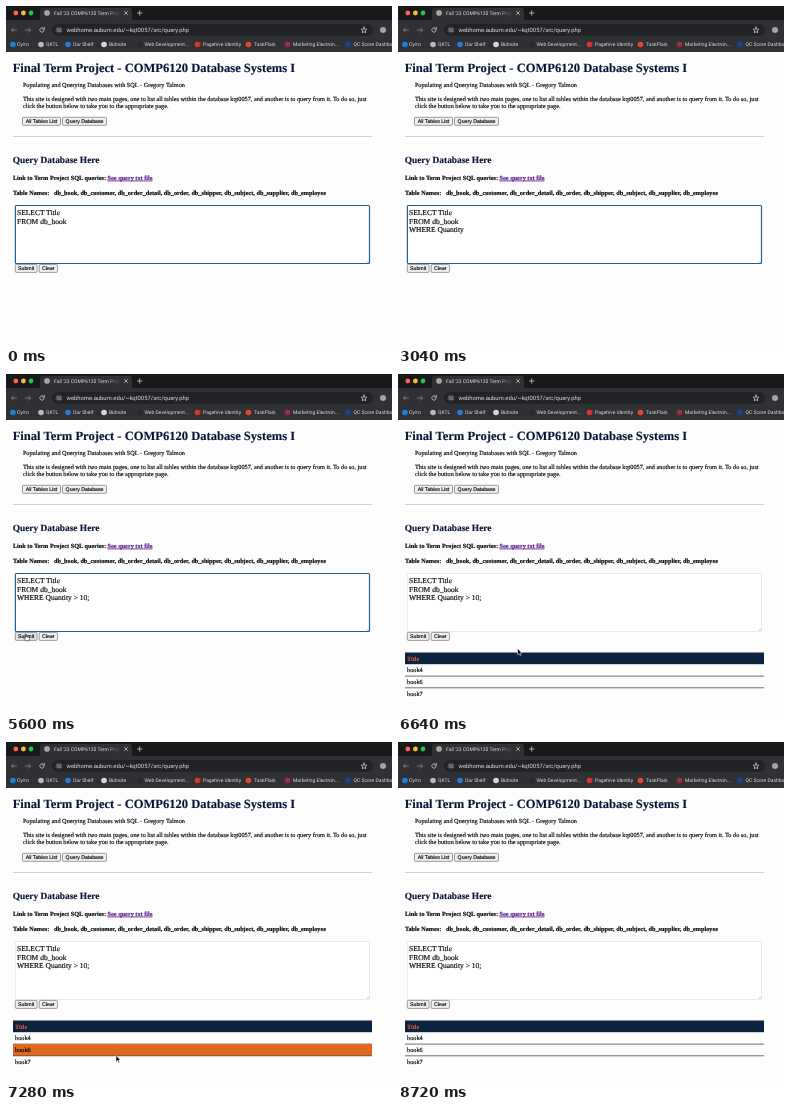
Write an HTML page that moves like this. It is 386x340 px and loops after 8800 ms.

```html
<!DOCTYPE html>
<html lang="en">
<head>
<meta charset="utf-8">
<title>Query page</title>
<style>
html, body { margin: 0; width: 100%; height: 100%; overflow: hidden; background: #fdfdfd; }
svg { display: block; width: 386px; height: 340px; }
text { white-space: pre; text-rendering: geometricPrecision; }
.serif { font: 6.25px "Liberation Serif", "Times New Roman", serif; }
.sans { font: 5.2px "Liberation Sans", Arial, sans-serif; }
.serif text, .sans text { stroke: #000; stroke-width: .14; }
.ui { font: 5px Roboto, sans-serif; fill: #dcdde0; }
.bold { font-weight: bold; }
.serif .title { font-weight: bold; fill: #0a1636; stroke: #0a1636; }
.line { fill: none; stroke: #c8c9cc; stroke-width: .8; stroke-linecap: round; }
.dim { stroke: #85868a; }
</style>
</head>
<body>
<svg viewBox="0 0 386 340">
  <!-- browser frame -->
  <rect width="386" height="46" fill="#303134"/>
  <rect width="386" height="14" fill="#18191b"/>
  <path d="M32 14q2 0 2-2V5q0-3 3-3h86q3 0 3 3v7q0 2 2 2z" fill="#303134"/>
  <circle cx="9.8" cy="7" r="2.4" fill="#ff5f57"/>
  <circle cx="17.4" cy="7" r="2.4" fill="#febc2e"/>
  <circle cx="25" cy="7" r="2.4" fill="#28c840"/>
  <g id="globe">
    <circle cx="41" cy="7" r="2.7" fill="#c8c9cc"/>
    <path d="M38.5 6.2h5M38.5 8h5M41 4.5v5" stroke="#55565a" stroke-width=".4"/>
  </g>
  <path id="spinner" class="line" d="M41 4.4a2.6 2.6 0 1 1-2.6 2.6" style="stroke:#8ab4f8"/>
  <linearGradient id="fade" gradientUnits="userSpaceOnUse" x1="100" x2="115">
    <stop stop-color="#dcdde0"/><stop offset="1" stop-color="#303134"/>
  </linearGradient>
  <text class="ui" x="48" y="8.8" style="fill:url(#fade)">Fall '23 COMP6120 Term Proj</text>
  <path class="line" d="M118.5 5.5l3 3m0-3l-3 3M131.5 7h4.4m-2.2-2.2v4.4"/>
  <path class="line dim" d="M10.5 24H5.5m2.2-2.2L5.5 24l2.2 2.2M19.5 24h5m-2.2-2.2l2.2 2.2-2.2 2.2"/>
  <path class="line" d="M38 22.6a2.3 2.3 0 1 0 .3 2M38.3 21.4v1.8h-1.8"/>
  <rect x="46" y="18" width="321" height="12" rx="6" fill="#222326"/>
  <circle cx="53" cy="24" r="3.6" fill="#38393c"/>
  <path class="line" d="M51 23h2.2m1.4 0h.4m-4 2h.4m1.4 0h2.2"/>
  <text class="ui" x="60.5" y="26" style="font-size:5.87px">webhome.auburn.edu/~kqt0057/src/query.php</text>
  <path class="line" d="M358 21.2l.8 1.9 2.1.2-1.6 1.4.5 2.1-1.8-1.1-1.8 1.1.5-2.1-1.6-1.4 2.1-.2z"/>
  <circle cx="377" cy="24" r="3" fill="#a6a7aa"/>
  <g id="bookmarks"></g>

  <!-- page -->
  <g class="serif">
    <text class="title" x="6.7" y="65.6" font-size="12.55">Final Term Project - COMP6120 Database Systems I</text>
    <text x="16.9" y="81">Populating and Querying Databases with SQL - Gregory Talmon</text>
    <text x="16.9" y="94.6">This site is designed with two main pages, one to list all tables within the database kqt0057, and another is to query from it. To do so, just</text>
    <text x="16.9" y="101.8">click the button below to take you to the appropriate page.</text>
    <path d="M7 130.5H366" stroke="#d0d0d0"/>
    <text class="title" x="6.7" y="157.4" font-size="9.4">Query Database Here</text>
    <text class="bold" x="6.9" y="173.6">Link to Term Project SQL queries: <tspan fill="#551a8b" stroke="#551a8b" text-decoration="underline">See query txt file</tspan></text>
    <text class="bold" x="6.9" y="189.4">Table Names:&#160;&#160; db_book, db_customer, db_order_detail, db_order, db_shipper, db_subject, db_supplier, db_employee</text>
    <rect id="area" x="9.4" y="199.5" width="354.1" height="58" rx="1" fill="#fff"/>
    <path d="M360.5 256.8l2.4-2.4m-1 2.4l1-1" stroke="#777" stroke-width=".4"/>
    <g style="font-size:7.5px">
      <text x="11" y="208.6">SELECT Title</text>
      <text x="11" y="217.5">FROM db_book</text>
      <text id="typed" x="11" y="226.4"></text>
    </g>
  </g>
  <g id="buttons" class="sans"></g>
  <g id="result" class="serif">
    <rect x="7" y="278.5" width="359" height="11.7" fill="#0c2340"/>
    <text class="bold" x="9" y="286.8" fill="#e8622a" style="stroke:none">Title</text>
    <g id="rows"></g>
  </g>
  <path id="arrow" d="M0 0v6.2l1.5-1.3 1 2.2 1-.5-1-2.1h2z" stroke="#fff" stroke-width=".5"/>
  <path id="hand" d="M-.6 .4q.6-.8 1.2 0v2.4l2.6.7q.5.2.4.8l-.5 2.5h-3.3l-1.9-2.6q0-.8.9-.4l.6.5z" fill="#fff" stroke="#000" stroke-width=".5"/>
</svg>
<script>
const $ = id => document.getElementById(id);
const show = (id, on) => $(id).style.display = on ? '' : 'none';

// icon x, icon colour, label x, label
$('bookmarks').innerHTML = [
  [7, '#1683d8', 11, 'Cyrro'], [35, '#b9babd', 40, 'QKTL'],
  [62, '#2180d5', 67, 'Our Shelf'], [98, '#d4d6d8', 103, 'Bidnote'],
  [134, '#28292c', 138.5, 'Web Development...'], [191.5, '#e0302d', 197, 'Pagehive Identity'],
  [242.5, '#e8432d', 248, 'TaskPlain'], [281.5, '#a8263c', 287, 'Marketing Electron...'],
  [342, '#1c3f94', 347.5, 'QC Score Dashboard']
].map(([cx, color, x, label]) =>
  `<circle cx="${cx}" cy="38.5" r="2.8" fill="${color}"/><text class="ui" x="${x}" y="40.2">${label}</text>`).join('');

$('buttons').innerHTML = [
  [16.5, 111.3, 38, 'All Tables List'], [56.5, 111.3, 44, 'Query Database'],
  [9.3, 258.4, 21.8, 'Submit'], [33.2, 258.4, 18.2, 'Clear']
].map(([x, y, w, label]) =>
  `<rect x="${x}" y="${y}" width="${w}" height="8" rx="1" fill="#efefef" stroke="#606060" stroke-width=".6"/>
   <text x="${x + w / 2}" y="${y + 5.8}" text-anchor="middle">${label}</text>`).join('');
const submit = $('buttons').querySelectorAll('rect')[2];

const rowTop = i => 290.4 + i * 11.7;
$('rows').innerHTML = ['book4', 'book6', 'book7'].map((name, i) =>
  `<rect x="7" y="${rowTop(i)}" width="359" height="11.7" fill="none"/>
   <text x="9" y="${rowTop(i) + 7.7}">${name}</text>
   ${i < 2 ? `<path d="M7 ${rowTop(i + 1)}H366" stroke="#333" stroke-width=".7"/>` : ''}`).join('');
const rows = $('rows').querySelectorAll('rect');

const phrase = 'WHERE Quantity > 10;';
const keyTimes = [160, 320, 480, 640, 800, 960, 1040, 1200, 1360, 1600, 1760, 1920, 2080, 2240,
  4080, 4240, 4400, 4560, 4720, 4880];

// time, x, y of the pointer tip
const path = [
  [5040, 48, 236], [5440, 20, 260], [6400, 20, 260], [6640, 119.5, 274.5], [6960, 114, 298],
  [7280, 110, 313.6], [7440, 110, 319], [7600, 110, 318], [8080, 111.5, 299],
  [8160, 112, 300], [8400, 113, 329], [8480, 113, 334]
];

function pointer(t) {
  const i = path.findIndex(p => p[0] > t);
  if (i < 1) return null;
  const [t0, x0, y0] = path[i - 1], [t1, x1, y1] = path[i];
  const u = (t - t0) / (t1 - t0);
  return [x0 + (x1 - x0) * u, y0 + (y1 - y0) * u];
}

function draw(t) {
  $('typed').textContent = phrase.slice(0, keyTimes.filter(k => k <= t).length);

  const focused = t < 5760, loading = t >= 5760 && t < 6160, loaded = t >= 6160;
  $('area').setAttribute('stroke', focused ? '#1a649c' : '#d4d4d4');
  $('area').setAttribute('stroke-width', focused ? 1.2 : .5);
  show('globe', !loading);
  show('spinner', loading);
  $('spinner').setAttribute('transform', `rotate(${t * .45} 41 7)`);
  show('result', loaded);

  const tip = pointer(t);
  const overSubmit = tip && tip[0] < 31 && tip[1] > 258 && tip[1] < 266.5;
  show('arrow', tip && !overSubmit);
  show('hand', overSubmit);
  if (tip) for (const id of ['arrow', 'hand']) $(id).setAttribute('transform', `translate(${tip})`);
  submit.setAttribute('fill', overSubmit ? '#e2e2e2' : '#efefef');
  const hover = tip && loaded ? Math.floor((tip[1] - rowTop(0)) / 11.7) : -1;
  rows.forEach((r, i) => r.setAttribute('fill', i === hover ? '#e0671b' : 'none'));
}

const start = performance.now();
function tick() {
  const t = (performance.now() - start) % 8800;
  draw(t - t % 80);
  requestAnimationFrame(tick);
}
tick();
</script>
</body>
</html>
```
